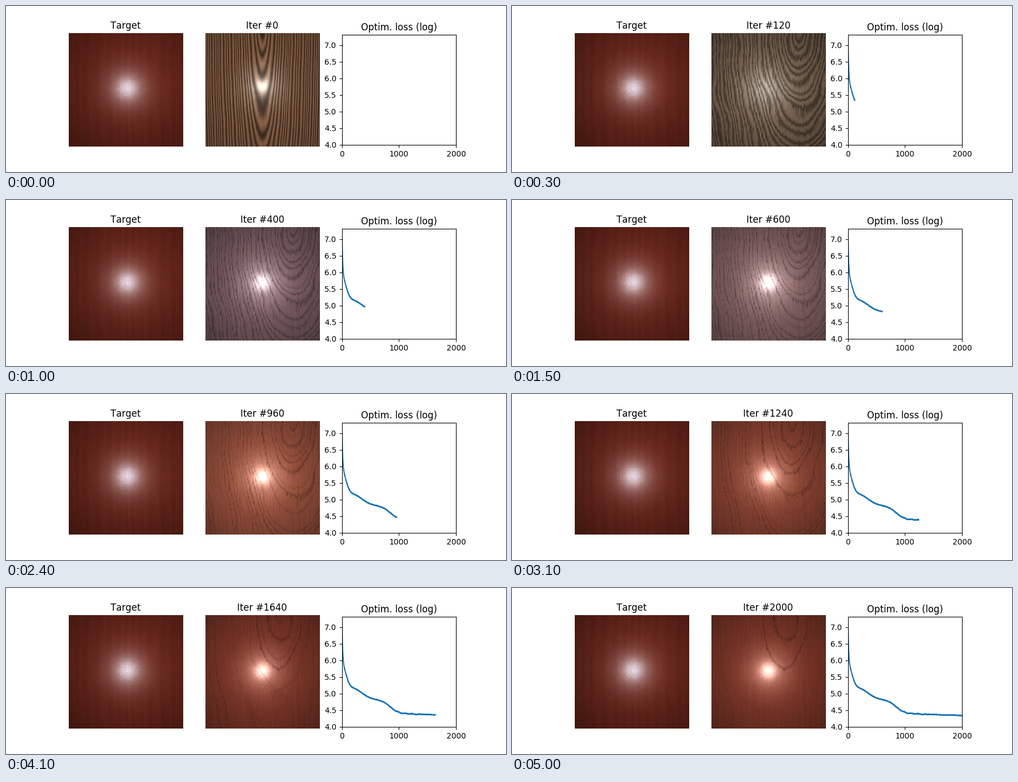
A matplotlib script that plays this animation: 900x300 px, repeating every 5.1 s.

```python
import numpy as np
import matplotlib.pyplot as plt
from matplotlib.animation import FuncAnimation
from matplotlib.colors import to_rgb

N = 206            # texture size in pixels
STEP = 40          # optimiser iterations per frame
FRAMES = 51
LAST = STEP * (FRAMES - 1)
LOSS_RANGE = (4, 7.316)

# Wood tone at a few iterations, blended in between
TONES = {0: "#8c6347", 120: "#866e59", 400: "#806267",
         680: "#8f6a68", 960: "#a05540", 1520: "#833a2a"}

rng = np.random.default_rng(7)
Y, X = np.mgrid[0:N, 0:N].astype(float)


def smooth(a, size, axis=0):
    """Box blur along one axis, wrapping at the edges, with unit deviation."""
    out = sum(np.roll(a, k - size // 2, axis) for k in range(size))
    return out / out.std()


def ease(x, start, end):
    u = np.clip((x - start) / (end - start), 0, 1)
    return u * u * (3 - 2 * u)


def drop(x, middle, spread):
    """Falling logistic step from 1 to 0."""
    return 1 / (1 + np.exp((x - middle) / spread))


def bell(x, width):
    return np.exp(-(x / width) ** 2)


def blob(cx, cy, sigma):
    return np.exp(-((X - cx) ** 2 + (Y - cy) ** 2) / (2 * sigma ** 2))


def vignette(cx, cy, amount):
    r2 = ((X - cx) ** 2 + (Y - cy) ** 2) / (N / 2) ** 2
    return 1 / (1 + amount * r2)


speckle = rng.normal(size=(N, N))
fibre = smooth(speckle, 9)
streak = smooth(rng.normal(size=(N, N)), 45)
wave = (np.sin(Y / 23 + X / 41) + 0.6 * np.sin(Y / 11 - X / 29 + 1)
        + 0.4 * np.sin(X / 9 + Y / 37))

# How long each growth ring survives; two strong ones outlast the rest
ring_life = rng.uniform(0, 0.8, 80)
ring_life[[3, 6]] = 1


def lit(base, shade, gloss, tint):
    img = base * shade[..., None] + gloss[..., None] * np.array(tint)
    return np.clip(img, 0, 1)


def target_wood():
    grain = 0.5 + 0.5 * np.sin(X / 2.6 + 0.9 * np.sin(Y / 60) + 2 * np.sin(X / 17))
    tone = 1 - 0.06 * grain + 0.02 * streak + 0.025 * speckle
    base = np.array(to_rgb("#6e281b")) * tone[..., None]
    gloss = 0.40 * blob(105, 100, 13) + 0.28 * blob(105, 100, 26)
    gloss = gloss * (1 + 0.06 * speckle) + 0.05 * blob(105, 100, 44)
    return lit(base, vignette(116, 92, 0.27), gloss, (0.66, 0.93, 1.05))


def wood_tone(it):
    rgb = np.array([to_rgb(c) for c in TONES.values()])
    return np.array([np.interp(it, list(TONES), col) for col in rgb.T])


def fitted_wood(it):
    move = ease(it, 0, 120)      # the rings find their new centre
    refine = ease(it, 80, 500)   # broad bands thin out into fine lines

    # Growth rings of a tilted cut through a trunk
    cx = 102 + 56 * move - 26 * ease(it, 960, 1520)
    s = np.hypot(X - cx, 10 - 5 * move + (0.105 + 0.255 * move) * Y)
    t = s / (4.3 + 1.7 * move) + 0.25 * np.sin(s / 7) + 0.2 * np.sin(s / 2.7 + 1)
    t += (0.05 + 0.2 * move) * (wave + 0.35 * fibre)
    life = ring_life[np.clip(t, 0, len(ring_life) - 1).astype(int)]
    strength = np.clip((life + 0.4 - 0.48 * it / 1000) / 0.4, 0, 1)
    strength *= 1 - refine * np.clip(0.35 + 0.25 * fibre, 0, 0.8)
    line = strength * bell(t % 1 - 0.5, 0.27 - 0.14 * refine)

    # Short broken pores take over where the rings fade away
    pores = 0.3 * refine * np.clip(fibre - 1.1, 0, 1)
    dark = np.clip(line + pores, 0, 1)
    contrast = 0.56 - 0.12 * move - 0.08 * refine - 0.04 * ease(it, 500, 960)
    tone = (1 - contrast * dark) * (1 + 0.025 * streak + 0.02 * speckle)
    base = wood_tone(it) * tone[..., None]

    hx, hy = 102 - 5 * move * (1 - refine), 97 + 4 * move
    core = 0.42 * (1 - move) + 0.04 + 0.56 * refine
    gloss = core * blob(hx, hy, 10) + 0.28 * blob(hx, hy, 27)
    gloss *= (1 - 0.45 * dark) * (1 + 0.06 * speckle)
    tint = (0.84 + 0.1 * refine, 0.96, 1.02 - 0.06 * refine)
    return lit(base, vignette(hx, hy, 0.1 + 0.2 * move), gloss, tint)


def loss_curve(x):
    steep = 1.31 * np.exp(-x / 11) + 0.65 * bell(x, 95)
    steps = 0.38 * drop(x, 350, 80) + 0.38 * drop(x, 840, 70)
    tail = 4.33 + 0.13 * bell(x, 1400)
    jitter = rng.normal(size=x.size)
    bumps = 0.01 * smooth(jitter, 40) * bell(x - 1150, 200)
    return steep + steps + tail + bumps + 0.004 * jitter


iters = np.arange(LAST + 1)
loss = loss_curve(iters)

plt.rcParams["text.kerning_factor"] = 6
fig, (ax_goal, ax_fit, ax_loss) = plt.subplots(1, 3, figsize=(9, 3), dpi=100)

ax_goal.imshow(target_wood(), interpolation="nearest")
ax_goal.set_title("Target")
fit_img = ax_fit.imshow(fitted_wood(0), interpolation="nearest")
fit_title = ax_fit.set_title("Iter #0")
for ax in (ax_goal, ax_fit):
    ax.axis("off")

loss_line, = ax_loss.plot([], [])
ax_loss.set(xlim=(0, LAST), ylim=LOSS_RANGE, title="Optim. loss (log)",
            xticks=[0, 1000, 2000], yticks=np.arange(4, 7.1, 0.5))
ax_loss.set_aspect(0.97 * LAST / np.ptp(LOSS_RANGE))


def draw(frame):
    it = frame * STEP
    fit_img.set_data(fitted_wood(it))
    fit_title.set_text(f"Iter #{it}")
    loss_line.set_data(iters[:it], loss[:it])
    return fit_img, fit_title, loss_line


def reset():
    return draw(0)


anim = FuncAnimation(fig, draw, frames=FRAMES, init_func=reset,
                     interval=100, repeat=True, repeat_delay=0)
plt.show()
```
